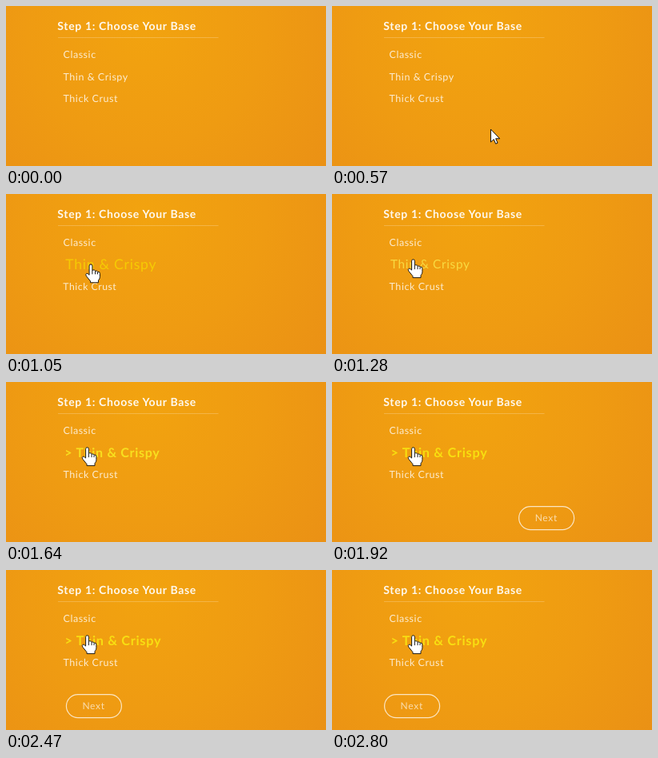
Recreate the animation shown at these times as an HTML page. Size 400 by 200 pixels, loop 3.16 s.

```html
<!DOCTYPE html>
<html lang="en">
<head>
<meta charset="utf-8">
<title>Choose Your Base</title>
<style>
  html, body { margin: 0; width: 100%; height: 100%; overflow: hidden; background: #ee9814; }
  svg { display: block; width: 400px; height: 200px; }
  text { font-family: Lato, "Open Sans", sans-serif; fill: #fff; text-rendering: geometricPrecision; white-space: pre; }
  .title { font-size: 14px; font-weight: 700; letter-spacing: .66px; fill-opacity: .93; }
  .item { font-size: 12.5px; letter-spacing: .55px; fill-opacity: .8; }
  .item.on { font-weight: 700; letter-spacing: .54px; fill-opacity: .95; }
  .next { font-size: 12px; letter-spacing: .7px; }
  .pointer path { fill: #fff; stroke: #111; stroke-width: 1; stroke-linejoin: round; }
  .pointer .lines { fill: none; }
</style>
</head>
<body>
<svg viewBox="0 0 400 200">
  <defs>
    <radialGradient id="glow" gradientUnits="userSpaceOnUse" cx="175" cy="25" r="300">
      <stop offset="0" stop-color="#f2a30f"/>
      <stop offset=".5" stop-color="#ef9b12"/>
      <stop offset="1" stop-color="#ea9015"/>
    </radialGradient>
  </defs>
  <rect width="400" height="200" fill="url(#glow)"/>
  <text class="title" x="64.3" y="29.9">Step 1: Choose Your Base</text>
  <path d="M65 39.5H265.5" stroke="#fff" stroke-opacity=".22"/>
  <g id="list"></g>
  <g id="next">
    <rect x=".6" y="155.6" width="69" height="29" rx="14.5" fill="none" stroke="#fff" stroke-opacity=".75" stroke-width="1.2"/>
    <text class="next" x="20.6" y="174.3" fill-opacity=".65">Next</text>
  </g>
  <g id="pointer" class="pointer">
    <path id="arrow" d="M0 0V16L3.8 12.6L6.2 18.2L8.6 17.1L6.2 11.7H11.3Z"/>
    <g id="hand" transform="scale(.95)">
      <path d="M-2 2Q-2 0 0 0T2 2V8Q3 6.8 5 7.6Q6 8.1 6 9Q8 7.6 9.2 9.8Q12 9.2 12 12V16.5Q12 19 10 21V24H-.5V22L-5.8 15.5Q-7.4 13 -5.6 12Q-4.2 11.4 -2 14Z"/>
      <path class="lines" d="M2 8V13M5.8 9V13M9 10V13"/>
    </g>
  </g>
</svg>
<script>
const LOOP = 3160, SELECT = 1490, SLIDE = 1512, REST = 2790;
const LEFT = 65, GROW = 0.3, HOVER_COLOR = [248, 225, 18];
const HOVER = [300, 7.5], LEAVE = [550, 30], ENTER = [120, 10];

const $ = id => document.getElementById(id);

// Hover times in ms; an item without "leave" stays hovered.
const items = [
  { label: 'Classic', y: 60.2 },
  { label: 'Thin & Crispy', y: 88.2, enter: 908, selected: true },
  { label: 'Thick Crust', y: 115.5, enter: 674, leave: 908 }
];

// Pointer path: time, x, y
const path = [
  [400, 254, 199], [674, 165, 127], [860, 120.5, 104.3],
  [908, 116, 100.3], [1050, 106, 88], [1230, 101.5, 81.8]
];

for (const item of items) {
  const el = document.createElementNS('http://www.w3.org/2000/svg', 'text');
  el.setAttribute('x', 6.5);
  el.setAttribute('y', 4.3);
  $('list').append(el);
  item.el = el;
}

// Damped spring around zero: returns [offset, velocity] after ms.
function spring(ms, [stiffness, damping], x, v = 0) {
  const t = ms / 1000, a = damping / 2, w = Math.sqrt(stiffness - a * a);
  const fade = Math.exp(-a * t), c = Math.cos(w * t), s = Math.sin(w * t);
  return [
    fade * (x * c + (v + a * x) / w * s),
    fade * (v * c - (a * v + stiffness * x) / w * s)
  ];
}

function hoverAmount(t, { enter, leave = Infinity }) {
  if (!(t >= enter)) return 0;
  const [x, v] = spring(Math.min(t, leave) - enter, HOVER, -1);
  return t < leave ? 1 + x : spring(t - leave, LEAVE, 1 + x, v)[0];
}

function pointerAt(t) {
  const i = path.findIndex(p => p[0] > t);
  if (i < 0) return path[path.length - 1].slice(1);
  const a = path[i - 1], b = path[i], k = (t - a[0]) / (b[0] - a[0]);
  return [a[1] + (b[1] - a[1]) * k, a[2] + (b[2] - a[2]) * k];
}

function drawItem(t, item) {
  const amount = hoverAmount(t, item), on = item.selected && t >= SELECT;
  const color = HOVER_COLOR.map(c => Math.max(0, Math.min(255, Math.round(255 + (c - 255) * amount))));
  const label = (on ? '> ' : '') + item.label;
  if (item.el.textContent !== label) item.el.textContent = label;
  item.el.setAttribute('class', on ? 'item on' : 'item');
  item.el.setAttribute('transform', `translate(${LEFT} ${item.y}) scale(${1 + GROW * amount})`);
  item.el.style.fill = `rgb(${color})`;
}

function show(el, visible) {
  el.style.display = visible ? '' : 'none';
}

function draw(t) {
  items.forEach(item => drawItem(t, item));

  show($('next'), t >= SLIDE);
  const shift = t < REST ? spring(t - SLIDE, ENTER, -1240)[0] : 0;
  $('next').setAttribute('transform', `translate(${LEFT + shift} 0)`);

  show($('pointer'), t >= path[0][0]);
  if (t >= path[0][0]) {
    $('pointer').setAttribute('transform', `translate(${pointerAt(t)})`);
    show($('arrow'), t < items[2].enter);
    show($('hand'), t >= items[2].enter);
  }
}

const start = performance.now();
function tick() {
  draw((performance.now() - start) % LOOP);
  requestAnimationFrame(tick);
}
tick();
</script>
</body>
</html>
```
